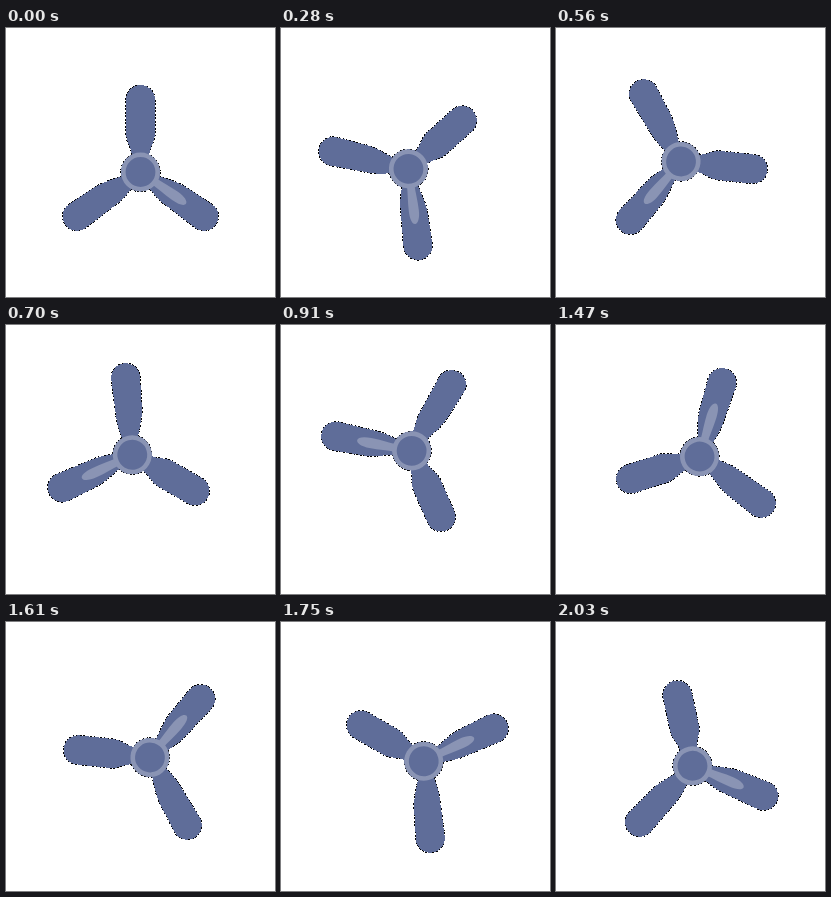
Animation, 269 px wide and 269 px high, one loop 2100 ms. Source, as an HTML page:

```html
<!DOCTYPE html>
<html lang="en">
<head>
<meta charset="utf-8">
<title>Propeller</title>
<style>
html, body { margin: 0; height: 100%; overflow: hidden; background: #fff; }
svg { display: block; width: 100%; height: 100%; }
</style>
</head>
<body>
<svg viewBox="0 0 269 269">
  <defs>
    <path id="side" d="M9 17C13 21 17 27 23 31.5L55 56A14.4 14.4 0 0 0 71.8 32.5L46 15.5C38 10 29 8 17 3.5L0 0Z"/>
    <g id="body">
      <path d="M-8.5 -17C-9.5 -26 -14.5 -30 -14.5 -38V-72.3A14.5 14.5 0 0 1 14.5 -72.3V-38C14.5 -30 9.5 -26 8.5 -17Z"/>
      <use href="#side"/>
      <use href="#side" transform="scale(-1 1)"/>
      <circle r="19.5"/>
    </g>
  </defs>
  <g id="rotor">
    <!-- the hub sits below the centre of rotation, so it wobbles -->
    <g transform="translate(0 9.5)">
      <g shape-rendering="crispEdges">
        <use href="#body" fill="none" stroke="#000" stroke-width="1.3" stroke-dasharray="2 1.5"/>
        <use href="#body" fill="#5f6d99"/>
      </g>
      <path transform="rotate(35)" fill="#8a94b4" d="M16 -4C24 -4 32 -5.3 42 -5.3C50 -5.3 55.5 -3 55.5 0C55.5 3 50 4.8 42 4.8C32 4.8 24 3.5 16 3.5Z"/>
      <circle r="17.2" fill="#5f6d99" stroke="#8a94b4" stroke-width="4.6"/>
    </g>
  </g>
</svg>
<script>
const STEP = 70, STEPS = 30;
const rotor = document.getElementById('rotor');

function draw() {
  const step = Math.floor(performance.now() / STEP) % STEPS;
  rotor.setAttribute('transform', `translate(134.5 134.5) rotate(${step * 360 / STEPS})`);
  requestAnimationFrame(draw);
}
draw();
</script>
</body>
</html>
```
